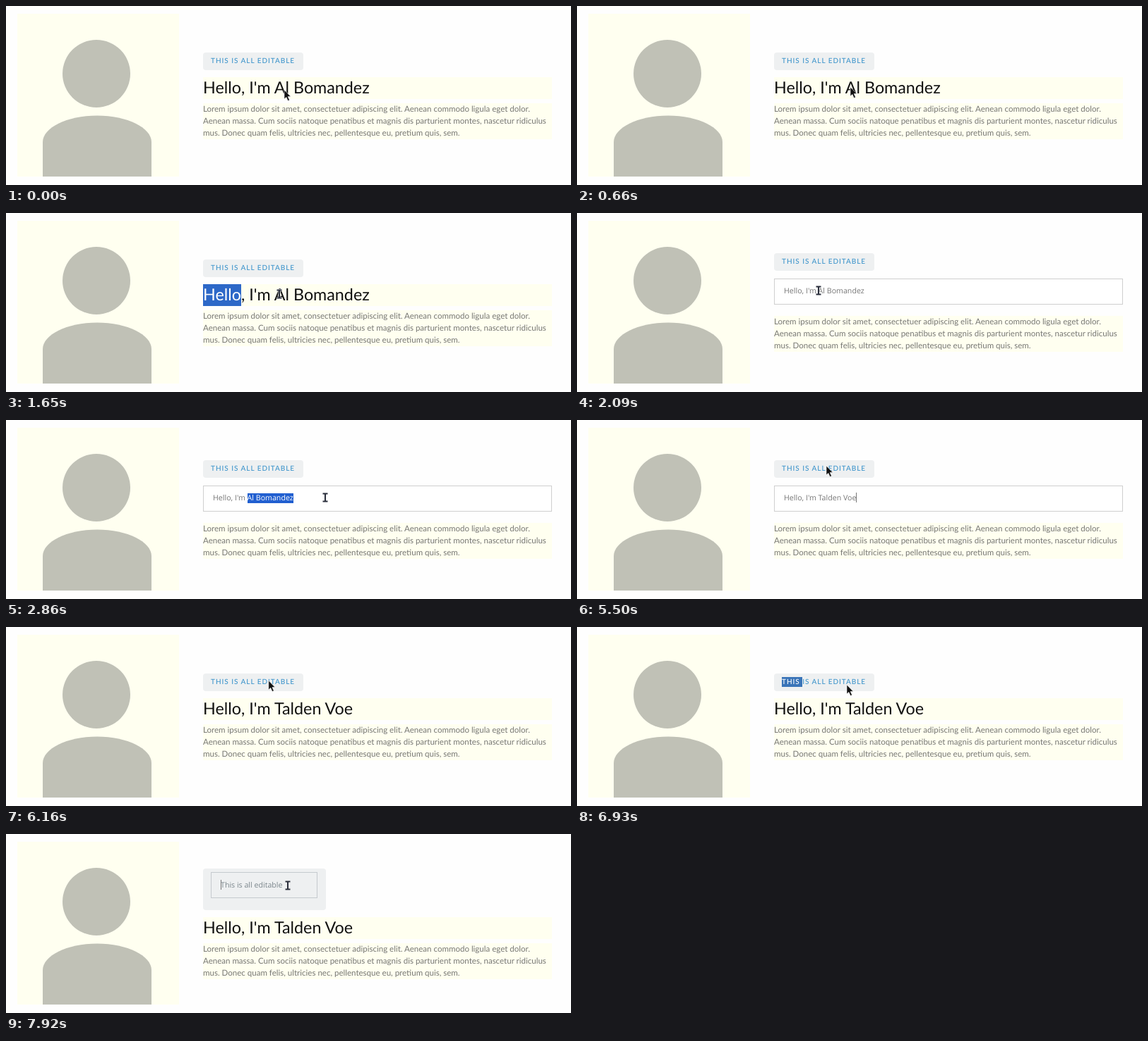
An HTML page for the animation above (8000 ms loop, 800 by 254 pixels).

```html
<!DOCTYPE html>
<html lang="en">
<head>
<meta charset="utf-8">
<title>Inline editing</title>
<style>
  html, body { margin: 0; width: 100%; height: 100%; overflow: hidden; background: #fefefe; }
  body { position: relative; font-family: Lato, sans-serif; text-rendering: geometricPrecision; }
  div, svg { position: absolute; white-space: pre; box-sizing: border-box; }
  b { font-weight: inherit; color: #fff; background: #215fd0; }
  #title, #text { left: 279px; width: 494px; background: #fffff0; }
  #title { height: 31px; font-size: 23.3px; line-height: 29.6px; color: #111; }
  #title b { padding-bottom: 3px; background: #2d68c8; }
  #text { height: 51px; font-size: 11.54px; line-height: 17px; color: #777774; }
  #badge { left: 279px; padding-left: 11px; border-radius: 4px; background: #eef0f1;
    font-size: 10px; font-weight: 500; line-height: 24.6px; letter-spacing: .96px; color: #4096cc; }
  #badge b { padding: 1px 0; background: #3a74b8; }
  .field { height: 37px; padding-left: 13px; border: 1px solid #cfcfcf; background: #fff;
    font: 10.64px/35px "Open Sans", sans-serif; color: #777; }
  #name { left: 279px; top: 93px; width: 494px; }
  #label { left: 290px; top: 54px; width: 151px; line-height: 37px; border-color: #c5cace; background: #eef0f1; color: #7b868c; }
  i { display: inline-block; width: 1px; height: 14px; margin-right: -1px; vertical-align: -3px; background: #777; }
  #cursor { left: 0; top: 0; overflow: visible; }
</style>
</head>
<body>
<svg width="260" height="254">
  <path fill="#fffff0" d="M16 11H245V242H16Z"/>
  <g fill="#c0c1b6">
    <circle cx="128" cy="96" r="48"/>
    <path d="M52 242V193C52 173 86 155.5 129 155.5S206 173 206 193V242Z"/>
  </g>
</svg>
<div id="badge"></div>
<div id="label" class="field"><i></i>This is all editable</div>
<div id="title"></div>
<div id="name" class="field"></div>
<div id="text">Lorem ipsum dolor sit amet, consectetuer adipiscing elit. Aenean commodo ligula eget dolor.
Aenean massa. Cum sociis natoque penatibus et magnis dis parturient montes, nascetur ridiculus
mus. Donec quam felis, ultricies nec, pellentesque eu, pretium quis, sem.</div>
<svg id="cursor" width="1" height="1">
  <path id="arrow" fill="#111" stroke="#fff" stroke-width=".6"
    d="M0 0V13L2.9 10.4L5.2 15.6L7.5 14.6L5.2 9.6H9.2Z"/>
  <g id="beam" fill="none">
    <path stroke="#fff" stroke-width="3" d="M-3.5 -5.5H3.5M0 -5.5V5.5M-3.5 5.5H3.5"/>
    <path stroke="#2b2f3c" stroke-width="2.1" d="M-3.5 -5.5H3.5M0 -5.5V5.5M-3.5 5.5H3.5"/>
  </g>
</svg>
<script>
const LOOP = 8000, STEP = 110;
const greeting = "Hello, I'm ", oldName = "Al Bomandez", newName = "Talden Voe";
const el = id => document.getElementById(id);
const show = (id, on) => el(id).style.display = on ? "" : "none";
const clamp = (v, lo, hi) => Math.min(hi, Math.max(lo, v));
const ease = k => k * k * (3 - 2 * k);

// pointer glides, each from where the one before ended
const home = { x: 394, y: 119 };
const glides = [
  { start: 110, time: 550, x: 387, y: 115 },
  { start: 1760, time: 330, x: 342, y: 110 },
  { start: 2200, time: 660, x: 452, y: 110 },
  { start: 5390, time: 110, x: 353, y: 65 },
  { start: 5500, time: 1100, x: 382, y: 82 },
  { start: 7370, time: 550, x: 399, y: 73 }
];

function pointer(t) {
  return glides.reduce((p, g) => {
    const k = ease(clamp((t - g.start) / g.time, 0, 1));
    return { x: p.x + (g.x - p.x) * k, y: p.y + (g.y - p.y) * k };
  }, home);
}

// one letter per step, in two bursts split at the space
function typed(t) {
  const burst = (start, from, to) => Math.min(to, from + (t - start) / STEP);
  return t < 4180 ? 0 : t < 4840 ? burst(4180, 2, 6) : burst(4840, 8, newName.length);
}

function fieldText(t, x) {
  if (t >= 3630) return greeting + newName.slice(0, typed(t)) + "<i></i>";
  if (t < 2090) return "<i></i>" + greeting + oldName;
  const n = clamp(Math.round((x - 342) / 6), 0, oldName.length);
  return greeting + (n ? "<b>" + oldName.slice(0, n) + "</b>" : "<i></i>") + oldName.slice(n);
}

function draw(t) {
  const { x, y } = pointer(t);
  const naming = t >= 1760 && t < 5720, labelling = t >= 7480;
  const beam = t >= 1650 && t < 5500 || labelling;
  const shift = labelling ? 17 : naming ? 8.5 : 0;

  Object.assign(el("badge").style, labelling
    ? { top: "48.5px", width: "174px", height: "59px" }
    : { top: 65.5 - shift + "px", width: "142px", height: "25px" });
  el("badge").innerHTML = labelling ? "" :
    (t >= 6930 ? "<b>THIS </b>" : "THIS ") + "IS ALL EDITABLE";
  show("label", labelling);

  el("title").style.top = 101 + shift + "px";
  el("title").innerHTML = t >= 5720 ? greeting + newName :
    (t >= 1650 ? greeting.replace("Hello", "<b>Hello</b>") : greeting) + oldName;
  show("title", !naming);
  show("name", naming);
  if (naming) el("name").innerHTML = fieldText(t, x);
  el("text").style.top = 137.5 + shift + "px";

  el("cursor").style.transform = `translate(${x}px, ${y}px)`;
  show("arrow", !beam);
  show("beam", beam);
}

let last = -1;
function tick() {
  const t = Math.floor(performance.now() % LOOP / STEP) * STEP;
  if (t !== last) draw(last = t);
  requestAnimationFrame(tick);
}
tick();
</script>
</body>
</html>
```
